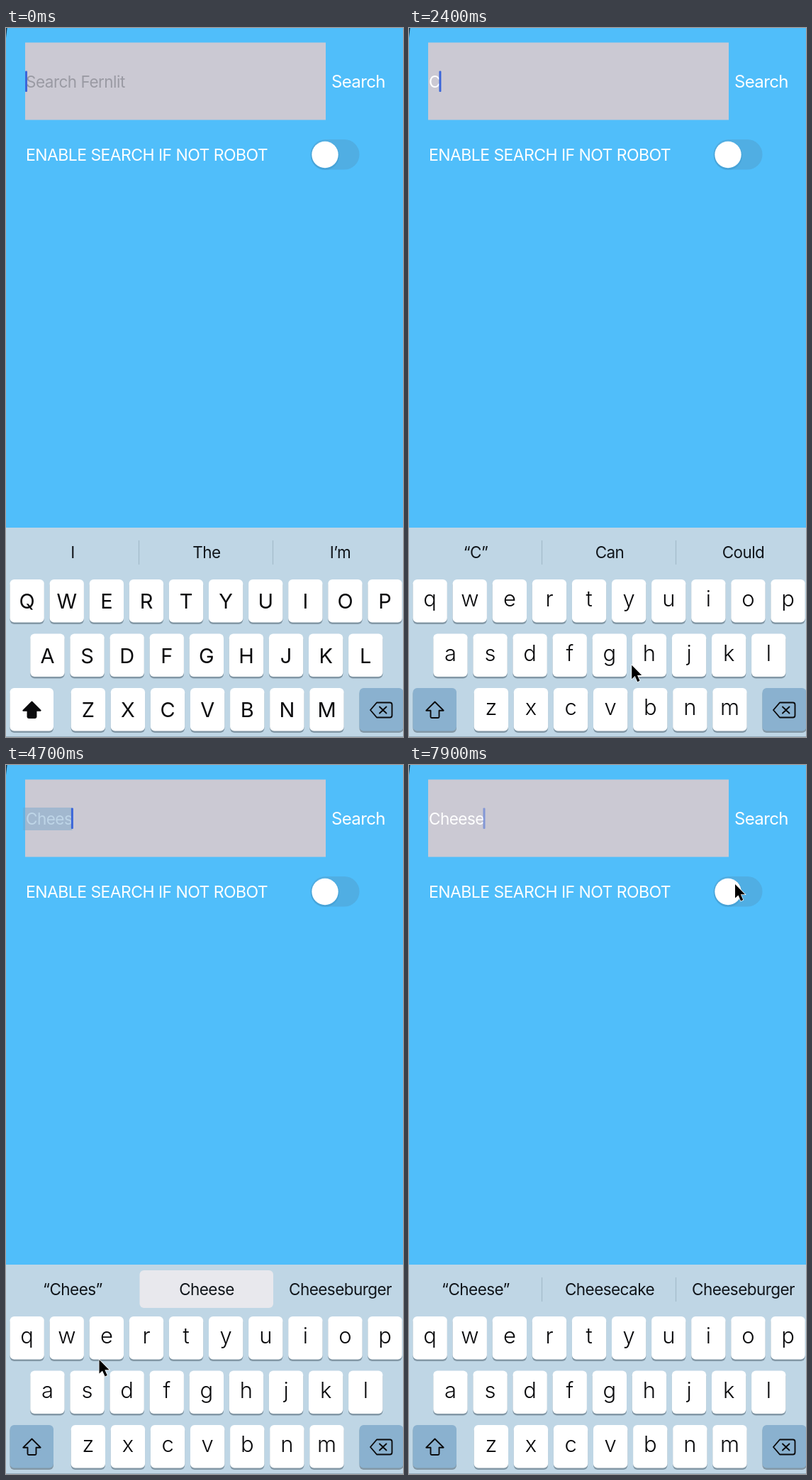
These frames come from a looping animation (560 px wide and 999 px high, 8000 ms). An HTML page:

```html
<!DOCTYPE html>
<html lang="en">
<head>
<meta charset="utf-8">
<title>Search field typing</title>
<style>
  html, body { margin: 0; width: 100%; height: 100%; overflow: hidden; background: #50befa; }
  svg { display: block; width: 100%; height: 100%; }
  text { font-family: Inter, "Open Sans", sans-serif; white-space: pre; }
  .field { font-size: 22.5px; letter-spacing: -.5px; fill: #fff; }
  .hint { fill: #9a9aa3; }
  .label { font-size: 23px; letter-spacing: -.57px; fill: #fff; }
  .button { font-size: 24px; letter-spacing: -.65px; fill: #fff; }
  .word { font-size: 22.5px; letter-spacing: -.55px; text-anchor: middle; fill: #10151a; }
  .tight { letter-spacing: -.85px; }
  .letter { font-size: 31px; text-anchor: middle; fill: #0b0b0d; font-weight: 350; }
  .caps .letter { font-size: 29px; font-weight: 400; }
  .icon { fill: none; stroke: #0b0b0d; stroke-width: 1.9; stroke-linejoin: round; stroke-linecap: round; }
</style>
</head>
<body>
<svg viewBox="0 0 560 999">
  <rect width="560" height="999" fill="#50befa"/>
  <path d="M0 0H1.6L0 14Z" fill="#12324a"/>
  <rect x="27" y="20.5" width="424" height="109" fill="#cbc9d3"/>
  <text id="hint" class="field hint" x="28" y="84">Search Fernlit</text>
  <text id="typed" class="field" x="28" y="84"></text>
  <rect id="mark" x="24" y="60" height="32" fill="#6fa3ca" opacity=".45"/>
  <rect id="caret" y="60.5" width="3" height="29.5" rx="1" fill="#3b66d9"/>
  <text class="button" x="459" y="84">Search</text>
  <text class="label" x="28" y="186.500">ENABLE SEARCH IF NOT ROBOT</text>
  <rect x="429.500" y="157" width="69" height="42.500" rx="21.250" fill="#50aee3"/>
  <circle cx="450" cy="180" r="20" fill="#3f9bd0" opacity=".55"/>
  <circle cx="450" cy="178.500" r="18.700" fill="#fff"/>

  <rect y="704" width="560" height="295" fill="#bfd6e5"/>
  <rect y="998" width="560" height="1" fill="#93abba"/>
  <path id="dividers" d="M187.500 722V756M376.500 722V756" stroke="#a5bccb" stroke-width="1.300"/>
  <rect id="choice" x="188.500" y="712" width="188.500" height="53" rx="6" fill="#e8e8ed"/>
  <text class="word" x="94" y="747"></text>
  <text class="word" x="283" y="747"></text>
  <text class="word" x="471.500" y="747"></text>
  <g id="keys"></g>
  <path id="shift" class="icon" d="M36.500 949.500L48.700 961.700H42.500V970.500Q42.500 972 41 972H32Q30.500 972 30.500 970.500V961.700H24.300Z"/>
  <path class="icon" d="M523 950.500H541.500Q544.500 950.500 544.500 953.500V968.500Q544.500 971.500 541.500 971.500H523L514 961ZM527 956.500L536.500 965.500M536.500 956.500L527 965.500"/>
  <path id="pointer" d="M0 0V19.500L4.500 15.400L8.100 23.500L11.300 22.100L7.800 14.200H14Z" fill="#000" stroke="#fff" stroke-width="1.400" paint-order="stroke"/>
</svg>
<script>
const LOOP = 8000, FRAME = 100;
const $ = id => document.getElementById(id);
const keys = $('keys'), words = document.querySelectorAll('.word');

function add(tag, attrs) {
  const el = document.createElementNS('http://www.w3.org/2000/svg', tag);
  for (const name in attrs) el.setAttribute(name, attrs[name]);
  keys.append(el);
  return el;
}

function addKey(x, y, width, fill) {
  add('rect', { x, y: y + 2, width, height: 61, rx: 6, fill: '#8398a6' });
  return add('rect', { x, y, width, height: 60.5, rx: 6, fill });
}

// Keyboard rows: letters, left edge, top
const letters = [];
for (const [row, left, top] of [['qwertyuiop', 5.5, 777], ['asdfghjkl', 34.3, 853.5], ['zxcvbnm', 91.7, 930]]) {
  [...row].forEach((char, i) => {
    const x = left + i * 56.1;
    addKey(x, top, 48.3, '#fff');
    letters.push({ char, top, el: add('text', { class: 'letter', x: x + 24.2 }) });
  });
}
const shiftKey = addKey(5.5, 930, 61.5, '#fff');
addKey(498.5, 930, 62, '#8ab1cf');

// Start time, typed text, three suggestions
const typing = [
  [0, '', 'I', 'The', 'I’m'],
  [1200, 'C', '“C”', 'Can', 'Could'],
  [3000, 'Ch', '“Ch”', 'Check', 'Chicken'],
  [3550, 'Che', '“Che”', 'Check', 'Cheese'],
  [3800, 'Chee', '“Chee”', 'Chew', 'Cheese'],
  [4500, 'Chees', '“Chees”', 'Cheese', 'Cheeseburger'],
  [5000, 'Cheese', '“Cheese”', 'Cheesecake', 'Cheeseburger']
];

// Time, x, y of the pointer tip
const path = [
  [300, 575, 985], [1100, 232, 954], [1800, 232, 954], [2700, 343, 878], [3000, 343, 878],
  [3350, 140, 795], [3850, 140, 795], [4100, 130, 834], [4400, 118, 878], [4550, 118, 878],
  [4850, 145, 798], [5000, 145, 798], [5200, 175, 734], [6200, 503, 65], [6900, 503, 65],
  [7500, 460, 168], [LOOP, 460, 168]
];

const clamp = v => Math.max(0, Math.min(1, v));

function pointerAt(t) {
  const i = Math.max(1, path.findIndex(p => p[0] > t));
  const [t0, x0, y0] = path[i - 1], [t1, x1, y1] = path[i];
  const k = clamp((t - t0) / (t1 - t0)), ease = k * k * (3 - 2 * k);
  return [x0 + (x1 - x0) * ease, y0 + (y1 - y0) * ease];
}

// Solid for half a second, then fades out and back in
function caretOpacity(age) {
  const phase = age % 1000 / 1000;
  return phase < .8 ? clamp((.6 - phase) / .1) : (phase - .8) / .2;
}

function setCaps(on) {
  keys.classList.toggle('caps', on);
  for (const { char, top, el } of letters) {
    el.textContent = on ? char.toUpperCase() : char;
    el.setAttribute('y', top + (on ? 41 : 38));
  }
  shiftKey.setAttribute('fill', on ? '#fff' : '#8ab1cf');
  $('shift').style.fill = on ? '#0b0b0d' : 'none';
}

let shown;
function showStep(step) {
  if (step === shown) return;
  shown = step;
  const [, text, ...hints] = step;
  $('typed').textContent = text;
  $('hint').style.display = text ? 'none' : '';
  hints.forEach((hint, i) => words[i].textContent = hint);
  setCaps(!text);
  const end = 28 + (text ? $('typed').getComputedTextLength() : 0);
  $('caret').setAttribute('x', end - (text ? 1.5 : 1));
  $('mark').setAttribute('width', end - 24);
  const correcting = text === 'Chee' || text === 'Chees';
  $('mark').style.display = $('choice').style.display = correcting ? '' : 'none';
  $('dividers').style.display = correcting ? 'none' : '';
}

function draw(now) {
  const t = Math.floor(now % LOOP / FRAME) * FRAME;
  const step = typing.filter(s => s[0] <= t).pop();
  showStep(step);
  words[2].classList.toggle('tight', t >= 5000 && t < 5400);
  $('caret').style.opacity = caretOpacity(t - step[0]);
  const [x, y] = pointerAt(t);
  $('pointer').setAttribute('transform', `translate(${x} ${y})`);
  $('pointer').style.display = t < path[0][0] ? 'none' : '';
}

const start = performance.now();
function tick() {
  draw(performance.now() - start);
  requestAnimationFrame(tick);
}
tick();
</script>
</body>
</html>
```
